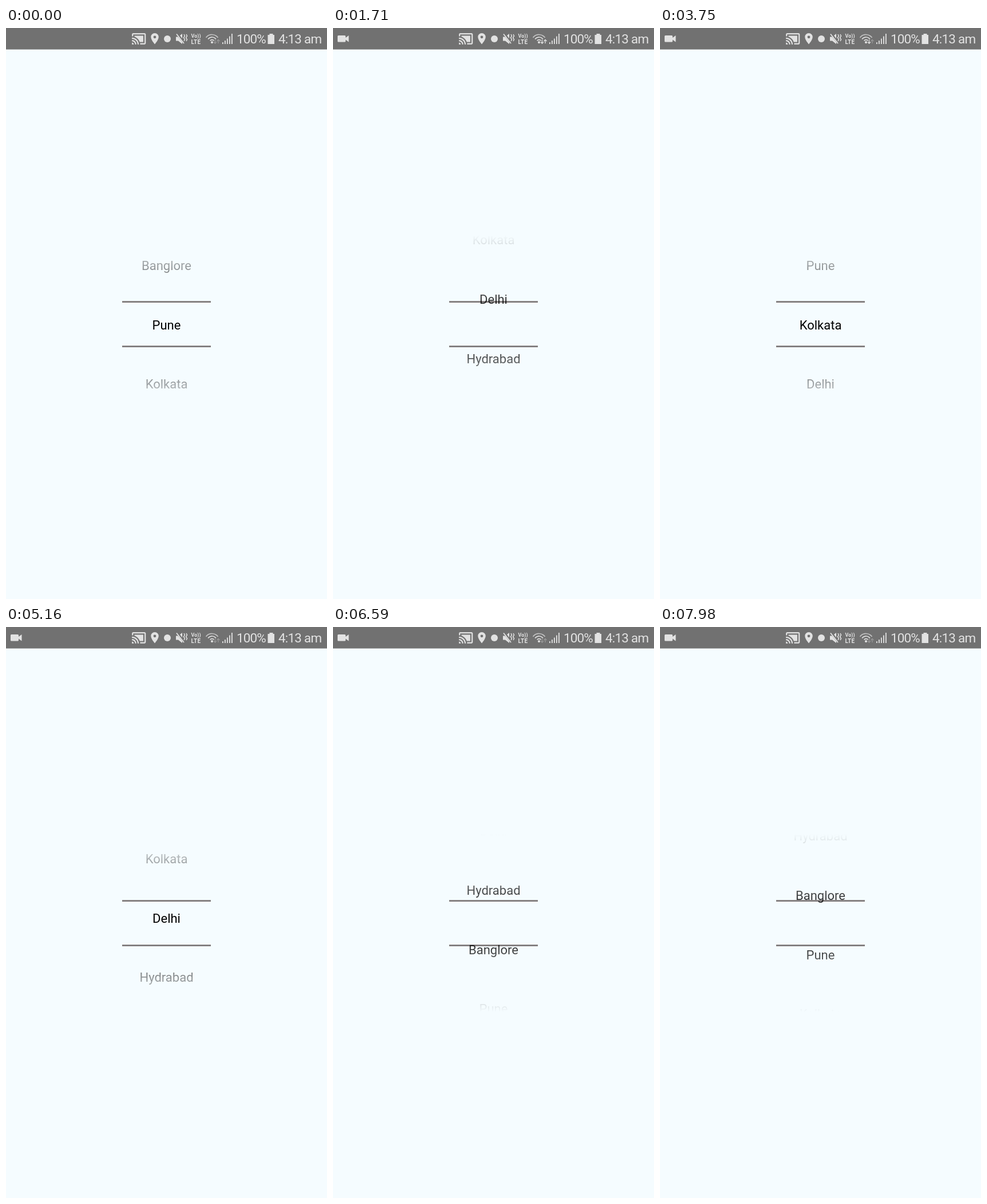
Animation, 561 px wide and 998 px high, one loop 8000 ms. Source, as an HTML page with a canvas:

```html
<!DOCTYPE html>
<html lang="en">
<head>
<meta charset="utf-8">
<title>City picker</title>
<style>
  html, body { margin: 0; width: 100%; height: 100%; overflow: hidden; background: #f5fcff; }
  canvas { display: block; }
</style>
</head>
<body>
<canvas id="stage" width="561" height="998"></canvas>
<script>
const W = 561, H = 998, LOOP = 8000;
const FONT = 'Roboto, "Open Sans", sans-serif';
const LIGHT = '#e2e2e2', DIM = '#979797', BAR = '#717171';
const CITIES = ['Banglore', 'Pune', 'Kolkata', 'Delhi', 'Hydrabad'];
const MID_X = 280.5, MID_Y = 526.7, ROW = 103.7;
const TOP = 362, BOTTOM = 673, FADE = 144.5;

// Wheel flings: start, duration, first row, rows travelled, power of the slow-down
const FLINGS = [
  { at: 1130, time: 2540, from: 1, by: 6, power: 2 },
  { at: 5040, time: 780, from: 2, by: 3, power: 2.7 },
  { at: 6180, time: 1060, from: 0, by: 6, power: 2.92 },
  { at: 7430, time: 550, from: 6, by: -0.52, power: 1 }
];

const CAST = new Path2D('M1 18v3h3c0-1.66-1.34-3-3-3zm0-4v2c2.76 0 5 2.24 5 5h2c0-3.87-3.13-7-7-7z' +
  'm18-7H5v1.63c3.96 1.28 7.09 4.41 8.37 8.37H19V7zM1 10v2c4.97 0 9 4.03 9 9h2c0-6.08-4.93-11-11-11z' +
  'm20-7H3c-1.1 0-2 .9-2 2v3h2V5h18v14h-7v2h7c1.1 0 2-.9 2-2V5c0-1.1-.9-2-2-2z');
const PIN = new Path2D('M12 2C8.1 2 5 5.1 5 9c0 5.3 7 13 7 13s7-7.7 7-13c0-3.9-3.1-7-7-7z' +
  'm0 9.5a2.5 2.5 0 1 1 0-5 2.5 2.5 0 0 1 0 5z');
const CAMERA = new Path2D('M9.5 13h11q1.5 0 1.5 1.5v2.5l5.5-4v11.500l-5.500-4v2.500q0 1.500-1.500 1.500h-11q-1.500 0-1.500-1.500v-8.500q0-1.500 1.500-1.500z');
const SPEAKER = new Path2D('M297 15.500h4l7-5.500v18l-7-5.500h-4z');
const BATTERY = new Path2D('M460.500 10h6v2h2.500v16h-11.500v-16h3z');

const canvas = document.getElementById('stage');
const ctx = canvas.getContext('2d');

const fade = ctx.createLinearGradient(0, TOP, 0, BOTTOM);
const edge = FADE / (BOTTOM - TOP);
fade.addColorStop(0, 'rgba(0,0,0,0)');
fade.addColorStop(edge, '#000');
fade.addColorStop(1 - edge, '#000');
fade.addColorStop(1, 'rgba(0,0,0,0)');

function rect(x, y, w, h, color) {
  ctx.fillStyle = color;
  ctx.fillRect(x, y, w, h);
}

function line(color, width, ...points) {
  ctx.strokeStyle = color;
  ctx.lineWidth = width;
  ctx.beginPath();
  for (let i = 0; i < points.length; i += 2) ctx.lineTo(points[i], points[i + 1]);
  ctx.stroke();
}

function label(text, x, y, font, spacing = 0) {
  ctx.font = font + ' ' + FONT;
  ctx.letterSpacing = spacing + 'px';
  ctx.textAlign = 'left';
  ctx.fillText(text, x, y);
  ctx.letterSpacing = '0px';
}

function icon(path, x, y, scale) {
  ctx.save();
  ctx.translate(x, y);
  ctx.scale(scale, scale);
  ctx.fill(path, 'evenodd');
  ctx.restore();
}

function wheelRow(t) {
  let row = 1;
  for (const f of FLINGS) {
    if (t < f.at) break;
    const u = Math.min(1, (t - f.at) / f.time);
    row = f.from + f.by * (1 - Math.pow(1 - u, f.power));
  }
  return row;
}

function drawWheel(t) {
  rect(203, 477.2, 155, 2.8, '#7f7a7b');
  rect(203, 555.2, 155, 2.8, '#7f7a7b');
  const row = wheelRow(t), near = Math.round(row);
  ctx.save();
  ctx.beginPath();
  ctx.rect(0, TOP, W, BOTTOM - TOP);
  ctx.clip();
  ctx.font = '22px ' + FONT;
  ctx.textAlign = 'center';
  ctx.fillStyle = fade;
  for (let i = near - 2; i <= near + 2; i++) {
    const city = CITIES[(i + CITIES.length) % CITIES.length];
    ctx.fillText(city, MID_X, MID_Y + (i - row) * ROW);
  }
  ctx.restore();
}

function drawMute() {
  ctx.fill(SPEAKER);
  line(BAR, 4, 299, 10, 313, 28);
  line(LIGHT, 1.8, 298, 10.500, 311, 27);
  for (const x of [311, 315]) line(LIGHT, 1.5, x, 11, x + 1.5, 14, x - 0.5, 17, x + 1.5, 20, x, 23);
}

function drawWifi(t) {
  const down = (t >= 530 && t < 2000) || (t >= 3590 && t < 4630);
  const up = t >= 530 && t < 2000;
  ctx.lineWidth = 1.7;
  [4, 8.500, 13].forEach((r, i) => {
    ctx.strokeStyle = i < 2 ? LIGHT : '#c4c4c4';
    ctx.beginPath();
    ctx.arc(360, 24.5, r, Math.PI * 1.2, Math.PI * 1.8);
    ctx.stroke();
  });
  ctx.fillStyle = LIGHT;
  ctx.beginPath();
  ctx.arc(360, 25, 2, 0, 7);
  ctx.fill();
  const a = down ? LIGHT : DIM, b = up ? LIGHT : DIM;
  line(a, 1.3, 365.5, 20.500, 365.5, 27);
  line(a, 1.3, 363, 24.5, 365.5, 27, 368, 24.5);
  line(b, 1.3, 371, 27, 371, 20.500);
  line(b, 1.3, 368.5, 23, 371, 20.500, 373.5, 23);
}

function drawStatus(t) {
  rect(0, 0, W, 37.5, BAR);
  ctx.fillStyle = LIGHT;
  ctx.globalAlpha = Math.min(1, Math.max(0, (t - 10) / 110));
  ctx.fill(CAMERA);
  ctx.globalAlpha = 1;
  icon(CAST, 219, 5.7, 1.1);
  icon(PIN, 248.5, 7.2, 0.96);
  ctx.beginPath();
  ctx.arc(282, 19, 6, 0, 7);
  ctx.fill();
  drawMute();
  label('Vo))', 323.5, 16.5, 'bold 9px');
  label('LTE', 323.5, 27.8, 'bold 10px', 0.2);
  drawWifi(t);
  [3, 6, 9.5, 13.5, 18].forEach((h, i) => rect(378 + i * 4, 28 - h, 1.8, h, LIGHT));
  ctx.fill(BATTERY);
  label('100%', 403, 27.3, '22.500px', -0.9);
  label('4:13 am', 476, 27.3, '22.500px', -0.8);
}

function draw(now) {
  const t = now % LOOP;
  rect(0, 0, W, H, '#f5fcff');
  drawStatus(t);
  drawWheel(t);
}

const start = performance.now();
function tick() {
  draw(performance.now() - start);
  requestAnimationFrame(tick);
}
tick();
</script>
</body>
</html>
```
